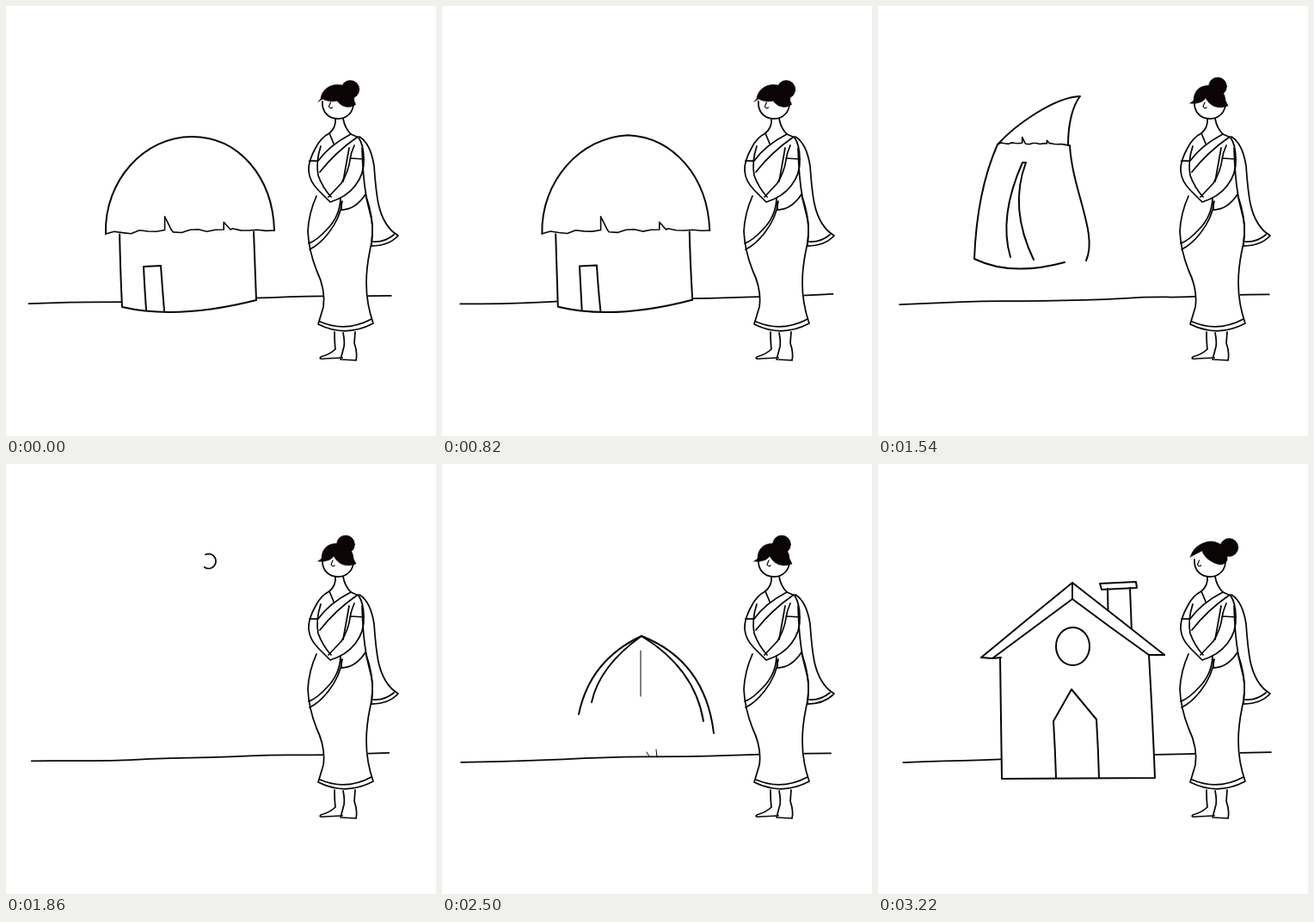
Animation, 500 px wide and 500 px high, one loop 3.86 s. Source, as an HTML page:

```html
<!DOCTYPE html>
<html lang="en">
<head>
<meta charset="utf-8">
<title>Hut to house</title>
<style>
  html, body { margin: 0; width: 100%; height: 100%; overflow: hidden; background: #fff; }
  svg { display: block; width: 100vw; height: 100vh; }
  path, ellipse { fill: none; stroke: #0b0505; stroke-width: 1.75; stroke-linecap: round; stroke-linejoin: round; vector-effect: non-scaling-stroke; }
  .bold > * { stroke-width: 2; }
  .paper { fill: #fff; }
  .ink { fill: #0b0505; stroke-width: .6; }
  .thin { stroke-width: 1; }
  path.mask { fill: #fff; stroke: none; }
</style>
</head>
<body>
<svg viewBox="0 0 500 500">
  <path id="ground"/>

  <g id="hut" class="bold">
    <path id="hutFill" class="mask"/>
    <path id="wallLeft"/>
    <path id="wallRight"/>
    <path id="hutDoor"/>
    <path id="domeFill" class="mask"/>
    <path id="dome"/>
    <path id="fringe" style="stroke-width:1.6"/>
  </g>

  <path id="swirl"/>

  <g id="house" class="bold">
    <path id="chimney" class="paper"/>
    <path id="body" class="paper"/>
    <path id="roof" class="paper"/>
    <path id="roofInner"/>
    <path id="eaves"/>
    <ellipse id="window" cx="226.5" cy="212" rx="19.5" ry="22"/>
    <path id="houseDoor" d="M207,365 Q206,332 204,299 L225,262 L254,297 Q256,330 257,365"/>
  </g>
  <path id="spark" class="thin"/>

  <!-- woman -->
  <path class="mask" d="M376 148L401 149Q424 158 428 188Q431 240 456 267Q444 278 426 279Q414 330 427 369Q395 386 363 370Q374 345 366 318Q350 285 351 262Q352 240 361 221Q350 200 353 185Q360 158 376 148Z"/>
  <path d="M382 379Q382 391 383 399Q377 405 366 408Q363 411 371 410L391 409M392 380Q394 390 393 396L389 411L407 412Q409 404 405 392L406 379"/>
  <path d="M361 221Q352 241 351 262Q352 284 361 307Q372 330 369 350L363 370Q395 386 427 369Q419 346 419 322Q419 305 423 285Q428 264 425 248L418 219"/>
  <path d="M365 367Q395 380 425 364"/>
  <path d="M411 152Q424 160 428 186Q430 215 433 230Q439 257 456 267Q445 279 425 279M414 165Q415 200 419 222Q427 246 426 264L425 279M427 274Q440 275 451 266"/>
  <path d="M376 148Q366 153 360 165Q351 181 352 192Q353 204 363 214L377 228Q396 222 406 209Q417 195 416 178Q416 162 410 153L401 149"/>
  <path d="M353 180L362 180M366 163Q360 181 363 197Q368 211 378 222M400 177L416 178M405 162Q401 171 400 179Q398 193 390 206L375 222"/>
  <path d="M376 148L381 160M401 149Q376 162 363 180M409 152Q383 170 365 193M399 165L392 204"/>
  <path d="M389 224Q388 245 373 260Q361 273 352 276M391 227Q389 246 375 264Q364 278 353 283M390 228L390 237Q406 237 418 219"/>
  <path d="M383 131Q384 141 376 148M392 131Q394 142 401 149"/>
  <path class="paper" d="M368 111C367 122 374 131 386 131C397 131 404 123 404 113"/>
  <path id="nose" d="M380 112L378 117Q380 120 382 118" style="stroke-width:1.2"/>
  <ellipse id="bun" class="ink" rx="10.5" ry="10.5"/>
  <path id="hair" class="ink"/>
</svg>

<script>
const LOOP = 3860, HOLD = 580, STEP = 80, LAST = 34;

// The hut: dome, then stretched to a point, then lifted off like a flame.
const dome = [
  'M116,265 C114,203 161,152 216,152 C271,152 310,199 312,261',
  'M122,262 C127,212 165,160 221,123 C255,165 293,205 300,261',
  'M139,161 C160,138 205,106 235,105 C227,115 221,135 221,162'
];
const wallLeft = [
  'M132,262 Q133,310 135,350 Q200,365 291,342',
  'M133,262 Q139,290 132,347 Q205,374 290,338',
  'M139,161 Q115,215 112,294 Q155,315 217,298'
];
const wallRight = [
  'M291,342 C290,315 289,290 288,262',
  'M294,338 C284,315 279,290 284,260',
  'M242,296 C256,265 226,215 223,162'
];
const hutDoor = [
  'M163,353 Q161,325 160,303 L180,302 Q182,330 184,354',
  'M157,355 Q164,322 159,293 L179,292 Q177,325 189,357',
  'M154,292 Q140,245 168,182 L172,182 Q152,235 181,295'
];

// The house: thin arcs that open into roof and walls.
const roof = [
  'M159,291 Q172,228 232,200 Q306,229 316,313',
  'M120,225 Q173,181 226,138 Q280,180 333,222'
];
const roofInner = [
  'M174,277 Q183,235 232,200 Q294,238 304,299',
  'M133,226 Q179,192 226,157 Q270,190 315,222'
];
const body = [
  'M190,230 Q192,286 195,342 L275,342 Q280,290 278,230',
  'M142,225 Q143,300 144,366 L322,365 Q319,290 315,222'
];

// Head seen from the front and from the side.
const hair = [
  'M363,113 L367,110 C367,98 375,92.5 384,92.5 C398,92.5 404,102 404,110 L407,116 C400,119 388,120 381,107 C378,112 371,114 363,113Z',
  'M363,108 L364,106 C367,97 377,90 388,90 C400,91 407,100 406,110 L406,112 C402,119 396,117 391,115 C383,111 379,107 377,101 C372,105 368,107 363,108Z'
];

const $ = id => document.getElementById(id);
const draw = (id, d) => $(id).setAttribute('d', d);
const show = (id, on) => $(id).style.display = on ? '' : 'none';
const ramp = (k, a, b) => Math.min(1, Math.max(0, (k - a) / (b - a)));
const backIn = u => u * u * (2.2 * u - 1.2);
const backOut = u => 1 + 3.5 * (u - 1) ** 3 + 2.5 * (u - 1) ** 2;
const numbers = d => d.match(/-?[\d.]+/g).map(Number);

// Random value from -1 to 1, fixed for each seed.
const noise = n => { const v = Math.sin(n * 91.7 + 4) * 43758.5; return (v - Math.floor(v)) * 2 - 1; };

function mix([a, b], u) {
  const to = numbers(b);
  let i = 0;
  return a.replace(/-?[\d.]+/g, n => +(+n + (to[i++] - n) * u).toFixed(2));
}

function scaleAt(id, x, y, s) {
  $(id).setAttribute('transform', `translate(${x} ${y}) scale(${s}) translate(${-x} ${-y})`);
}

// Hand-drawn line, redrawn a little differently at each step.
function ground(k) {
  const from = 27 + noise(k) * 6, to = 451 + noise(k + 50) * 9, n = 9;
  let d = '', last;
  for (let i = 0; i <= n; i++) {
    const x = from + (to - from) * i / n;
    const y = 347 - x * 0.025 + noise(k * 13 + i) * 1.2;
    d += i ? ` Q${last} ${(last[0] + x) / 2},${(last[1] + y) / 2}` : `M${x},${y}`;
    last = [x, y];
  }
  return d + ` L${last}`;
}

// Ragged straw edge with two torn spikes.
function fringe(x0, y0, x1, y1) {
  const n = 20, w = (x1 - x0) / n, size = w / 10;
  let d = `M${x0},${y0}`;
  for (let i = 1; i < n; i++) {
    const x = x0 + w * i, y = y0 + (y1 - y0) * i / n - 1.5 + noise(i) * 2 * size;
    const spike = i === 7 ? 16 : i === 14 ? 9 : 0;
    d += ` L${x},${y}`;
    if (spike) d += ` L${x},${y - spike * size} L${x + w * 0.8},${y}`;
  }
  return d + ` L${x1},${y1}`;
}

function drawHut(k) {
  show('hut', k <= 14);
  const lift = k > 8;
  const u = lift ? backIn(ramp(k, 8, 13)) : ramp(k, 0, 8) ** 4;
  const pose = shapes => mix(shapes.slice(lift ? 1 : 0), u);
  const top = pose(dome), left = pose(wallLeft), right = pose(wallRight);
  const p = numbers(top);
  draw('dome', top);
  draw('domeFill', top);
  draw('fringe', fringe(p[0], p[1], p[12], p[13]));
  draw('wallLeft', left);
  draw('wallRight', right);
  draw('hutFill', left + right.replace('M', ' L'));
  draw('hutDoor', pose(hutDoor));
  scaleAt('hut', p[6], p[7], 1 - ramp(k, 13, 15));
}

// Spiral that winds up where the hut vanished, then drops to the ground.
function drawSwirl(k) {
  show('swirl', k >= 15 && k <= 21);
  const tail = 1 - ramp(k, 15, 17), drop = ramp(k, 17, 21);
  const a0 = -115 - 80 * tail, a1 = 125 - 90 * drop;
  const y = 113 + 205 * drop ** 2;
  let d = '';
  for (let i = 0; i <= 20; i++) {
    const v = i / 20, a = (a0 + (a1 - a0) * v) * Math.PI / 180;
    const r = 8.5 + 45 * tail * (1 - v) ** 2;
    d += `${i ? ' L' : 'M'}${235.5 + r * Math.cos(a)},${y + r * Math.sin(a)}`;
  }
  draw('swirl', d);
}

function drawSpark(k) {
  show('spark', k >= 22 && k <= 25);
  const wait = 25 - k, x = 231 + 4 * wait;
  const line = k > 22 ? `M${x},${217 + 42 * wait} L${x},${270 + 32 * wait}` : '';
  draw('spark', line + ' M238,335 L241,340 M249,332 L250,341');
}

function drawHouse(k) {
  show('house', k >= 25);
  const open = backOut(ramp(k, 25, 30));
  const outer = mix(roof, open), inner = mix(roofInner, open);
  draw('roof', outer);
  draw('roofInner', inner);

  const o = numbers(outer), n = numbers(inner);
  show('eaves', k >= 28);
  draw('eaves', [0, 4, 8].map(i => `M${o[i]},${o[i + 1]} L${n[i]},${n[i + 1]}`).join(' ') +
    ` M${n[0]},${n[1]} l10,-1`);

  show('body', k >= 26);
  draw('body', mix(body, ramp(k, 26, 30)));
  const grow = backOut(ramp(k, 27, 31));
  for (const id of ['window', 'houseDoor']) show(id, k >= 28);
  scaleAt('window', 226.5, 212, grow);
  scaleAt('houseDoor', 231, 365, grow);

  const rise = ramp(k, 30, LAST), y = 200 - 62 * rise - 115 * Math.sin(Math.PI * rise);
  show('chimney', rise > 0);
  draw('chimney', `M267,${y + 7} L268,196 L295,196 L293,${y + 6} M258,${y + 1} L300,${y - 1} L301,${y + 6} L260,${y + 8}Z`);
}

function drawHead(k) {
  const turn = 0.4 * (1 - ramp(k, 7, 10)) + ramp(k, 28, 31);
  draw('hair', mix(hair, turn));
  $('bun').setAttribute('cx', 395 + 13.3 * turn);
  $('bun').setAttribute('cy', 93.5 + Math.min(3.5, 9 * turn));
  $('nose').setAttribute('transform', `translate(${-6.5 * turn} 0)`);
}

function render(k) {
  draw('ground', ground(k));
  drawHut(k);
  drawSwirl(k);
  drawSpark(k);
  drawHouse(k);
  drawHead(k);
}

const start = performance.now();
let shown = -1;
function tick() {
  const t = (performance.now() - start) % LOOP;
  const k = t < HOLD ? 0 : Math.min(LAST, 1 + Math.floor((t - HOLD) / STEP));
  if (k !== shown) render(shown = k);
  requestAnimationFrame(tick);
}
tick();
</script>
</body>
</html>
```
